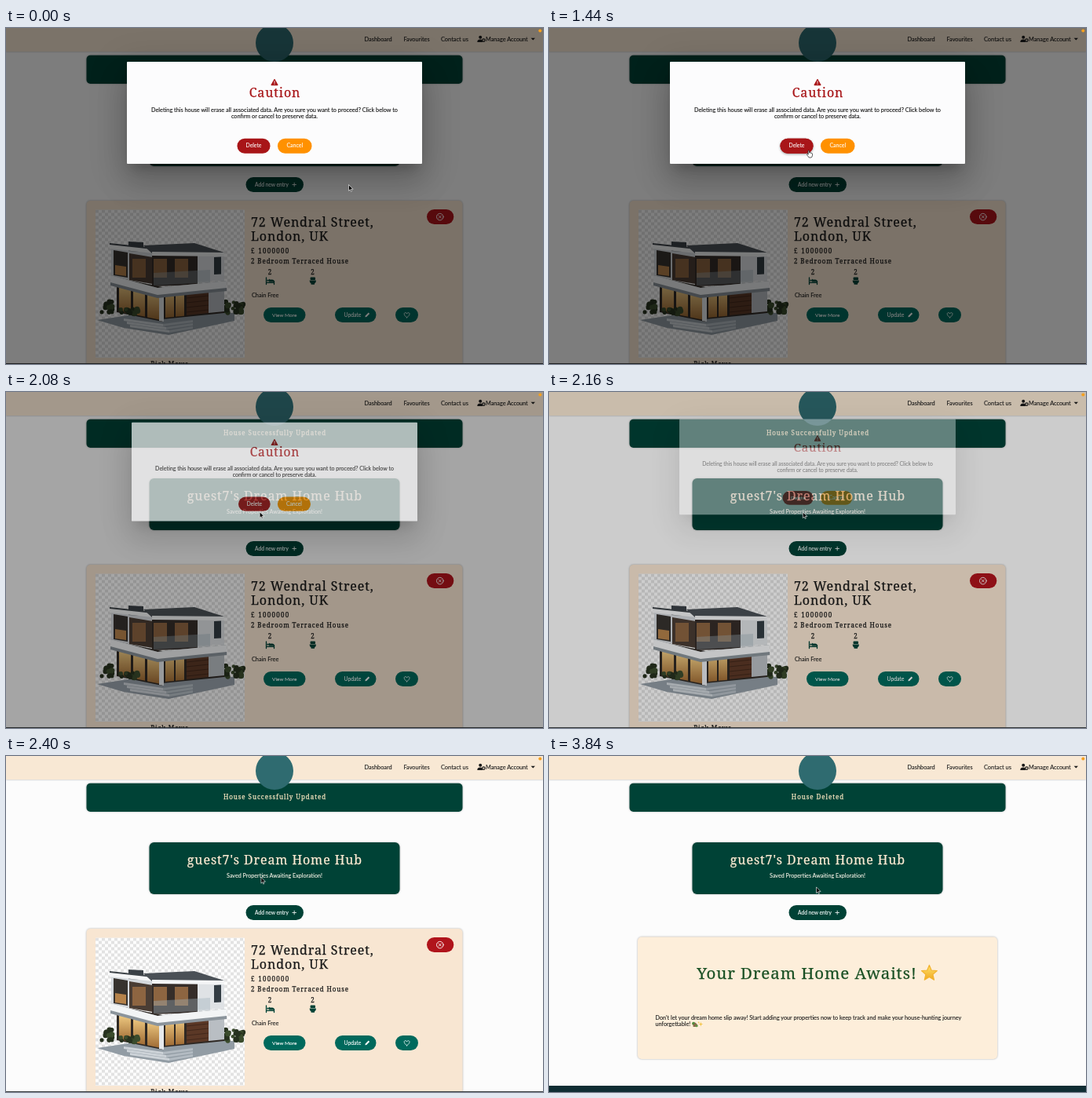
These frames come from a looping animation (684x428 px, 3.92 s). An HTML page:

```html
<!DOCTYPE html>
<html lang="en">
<head>
<meta charset="utf-8">
<title>Dream Home Hub</title>
<style>
html, body { margin: 0; width: 100%; height: 100%; overflow: hidden; background: #fcfcfc; }
svg { display: block; width: 100vw; height: 100vh; }
text { white-space: pre; }
.sans { font-family: Lato, "Open Sans", sans-serif; stroke-width: .1; }
.serif { font-family: "Noto Serif", serif; stroke-width: .25; }
.lift { filter: drop-shadow(0 .8px .8px rgba(0,0,0,.32)); }
</style>
</head>
<body>
<svg id="stage" viewBox="0 0 684 428" preserveAspectRatio="none"></svg>
<script>
const LOOP = 3920, STEP = 80, CLOSE = 2000, FADE = 260, SWAP = 2560;
const GREEN = '#004236', TEAL = '#00695c', SAND = '#f8e6d2', CREAM = '#fdeeda';
const RED = '#a81518', INK = '#1a1a1a', LIFT = 'class="lift"';

const text = (kind, x, y, s, size, fill, anchor, more = '') =>
  `<text class="${kind}" x="${x}" y="${y}" font-size="${size}" fill="${fill}" stroke="${fill}" text-anchor="${anchor}" ${more}>${s}</text>`;
const sans = (x, y, s, size = 7.3, fill = INK, anchor = 'start') => text('sans', x, y, s, size, fill, anchor);
// Centred text is nudged by half the trailing letter gap.
const serif = (x, y, s, size, fill = INK, anchor = 'start', gap = .9) =>
  text('serif', anchor === 'middle' ? x + gap / 2 : x, y, s, size, fill, anchor, `letter-spacing="${gap}"`);

const box = (x, y, w, h, fill, r = 0, more = '') =>
  `<rect x="${x}" y="${y}" width="${w}" height="${h}" rx="${r}" fill="${fill}" ${more}/>`;
const pill = (x, y, w, fill) => box(x, y, w, 19, fill, 9.5);
const path = (d, fill = 'none', more = '') => `<path d="${d}" fill="${fill}" ${more}/>`;
const disc = (x, y, r, fill, more = '') => `<circle cx="${x}" cy="${y}" r="${r}" fill="${fill}" ${more}/>`;
const line = (color, w) => `stroke="${color}" stroke-width="${w}" stroke-linecap="round" stroke-linejoin="round"`;
const group = (id, body) => `<g id="${id}">${body}</g>`;
const repeat = (n, f) => Array.from({ length: n }, (_, i) => f(i)).join('');
// A wall panel: upright sides, top and bottom sloping by `drop`.
const wall = (x, y, w, h, drop, fill, more) => path(`M${x} ${y}l${w} ${drop}v${h}l${-w} ${-drop}z`, fill, more);

const star = (cx, cy, R, r, n, fill, more = '') => path('M' + repeat(n * 2, i => {
  const a = i * Math.PI / n - Math.PI / 2, d = i % 2 ? r : R;
  return `${cx + d * Math.cos(a)} ${cy + d * Math.sin(a)} `;
}) + 'z', fill, more);

let seed = 7;
const random = () => (seed = seed * 16807 % 2147483647) / 2147483647;
const hedge = (x, y, w, h, n) => repeat(n, () =>
  disc(x + w * random(), y + h * random(), 2 + 2 * random(), random() < .6 ? '#27321f' : '#3b4c2d'));

const blur = (id, dev) => `<filter id="${id}" x="-50%" y="-100%" width="200%" height="300%"><feGaussianBlur stdDeviation="${dev}"/></filter>`;
const fade = (id, a, b) => `<linearGradient id="${id}" x2="0" y2="1"><stop stop-color="${a}"/><stop offset="1" stop-color="${b}"/></linearGradient>`;
const defs = `<defs>
  <pattern id="check" x="114" y="231.5" width="8" height="8" patternUnits="userSpaceOnUse">
    ${box(0, 0, 8, 8, '#fdfdfd')}${box(0, 0, 4, 4, '#e2e2e2')}${box(4, 4, 4, 4, '#e2e2e2')}
  </pattern>
  ${fade('gold', '#ffe36a', '#f0a822')}${fade('glow', '#f3cf86', '#a06c35')}
  ${blur('blur0', 19)}${blur('blur1', 23)}${blur('blur2', 7.5)}
</defs>`;

const header = box(0, 0, 684, 30, '#f8e8d4', 0, LIFT) + disc(342, 19, 24, '#2f6b70') +
  sans(456.5, 17.4, 'Dashboard', 7.4) + sans(506.5, 17.4, 'Favourites') +
  sans(554, 17.4, 'Contact us', 7.4) + sans(611, 17.4, 'Manage Account') +
  disc(604.2, 11.8, 2, INK) + path('M600.3 18c0-2.6 1.6-3.5 3.9-3.5l2 .4 1 3.1z', INK) +
  disc(608.4, 15.6, 1.7, 'none', line(INK, 1.2)) + path('M668.6 12.7h5.4l-2.7 2.7z', INK);

const hub = box(102.5, 34.7, 479, 36.3, GREEN, 5, LIFT) + box(182.5, 110, 319, 66, GREEN, 6, LIFT) +
  serif(342, 138, 'guest7\'s Dream Home Hub', 16, '#fdebd3', 'middle') +
  sans(342, 155.2, 'Saved Properties Awaiting Exploration!', 7.17, '#fdf6ea', 'middle') +
  pill(305.5, 190, 73.5, GREEN) + sans(317, 201.6, 'Add new entry', 6.65, '#fff') +
  path('M364.9 199.5h4.6m-2.3-2.3v4.6', 'none', line('#fff', .8));
const notice = s => serif(342, 55.3, s, 8, '#f3e2bd', 'middle', .95);

const house =
  path('M116 372l80-12 95 3v10l-84 18-57-9z', '#929ca4') +
  hedge(122, 348, 14, 15, 18) + hedge(278, 349, 24, 14, 26) +
  // ground floor
  wall(141, 318, 58, 44, 12, '#2f2924') + wall(199, 331, 79, 40, -8, '#2f2924') +
  repeat(3, i => wall(144 + i * 18, 328 + i * 3.7, 15, 33, 3, 'url(#glow)')) +
  repeat(2, i => wall(203 + i * 13, 335 - i * 1.3, 11, 34, -1, 'url(#glow)')) +
  wall(230, 330, 28, 36, -3, '#5b3826') +
  repeat(5, i => path(`M230 ${338 + i * 6}l28-3`, 'none', line('#3b2418', .8))) +
  wall(258, 327, 20, 36, -2, '#b9bec3') + wall(195, 332, 6, 41, 1, '#e6e9ec') +
  // upper floor and balcony
  wall(134, 277, 54, 40, 8, '#d5d9dd') + wall(137, 283, 18, 32, 3, '#37332f') +
  wall(139, 302, 14, 12, 2, '#b5824a') + wall(157, 287, 30, 34, 5, '#4a3d34') +
  wall(186, 289, 58, 40, -2, '#352d29') + repeat(3, i => wall(161 + i * 27, 294, 17, 24, 0, '#8d6541')) +
  wall(244, 287, 34, 36, -1, '#dfe2e5') + wall(265, 292, 9, 22, -.5, '#333c43') +
  wall(188, 312, 72, 16, -4, '#9db0ba', 'opacity=".4"') +
  // flat roofs, chimney and slab
  wall(156, 272, 19, 12, 1, '#3a4046') + wall(132, 275, 56, 6, 6, '#f4f5f6') + wall(132, 274, 56, 2, 6, '#3d4348') +
  path('M175 277l65-3 38 12-92 1z', '#4a5056') + wall(186, 285, 92, 5, 1, '#f4f5f6') +
  wall(133, 315, 60, 13, 16, '#8b949b') + wall(193, 331, 88, 13, -9, '#8b949b') +
  wall(133, 315, 60, 9, 16, '#f2f4f5') + wall(193, 331, 88, 9, -9, '#f2f4f5') +
  repeat(3, i => wall(150 + i * 4, 370 + i * 4, 50, 3, 7, '#cdd3d8') + wall(200 + i * 4, 377 + i * 4, 38 - i * 4, 3, -5, '#b3bbc2')) +
  hedge(142, 358, 26, 6, 20);

const listing = notice('House Successfully Updated') +
  box(102.5, 220, 479, 230, SAND, 5, LIFT) + box(114, 231.5, 190, 188.5, 'url(#check)') + house +
  serif(312, 252.8, '72 Wendral Street,', 16) + serif(312, 270.8, 'London, UK', 16) +
  serif(312, 286.6, '£ 1000000', 8, INK, 'start', 1.3) + serif(312, 300.2, '2 Bedroom Terraced House', 8) +
  serif(336, 314, '2', 8, INK, 'middle') + serif(390.5, 314, '2', 8, INK, 'middle') +
  path('M331.5 318v8.5m0-2.1h10m0 2.1v-4.2h-6v-1.8', 'none', line(GREEN, 1.3)) +
  path('M335 323.6v-3.2h4.4q2 0 2 2v1.2z', GREEN) + disc(333.6, 321.6, 1.2, GREEN) +
  box(387.6, 317.6, 6.4, 3.4, GREEN, .8) + path('M386.6 321.6h8.4q0 3-2 3.9v1.3h-4.4v-1.3q-2-.9-2-3.9z', GREEN) +
  sans(313, 343.4, 'Chain Free') +
  pill(328, 356, 53.5, TEAL) + sans(354.7, 367.8, 'View More', 6.5, '#fff', 'middle') +
  pill(419, 356, 52.5, TEAL) + sans(430.5, 367.8, 'Update', 6.8, '#fff') +
  path('M457.4 368.3l.4-1.8 3.9-3.9 1.4 1.4-3.9 3.9z', '#fff') + pill(496, 356, 29, TEAL) +
  path('M510.6 368.8c-5-3.6-3.5-6.2-1.9-6.2q1.3 0 1.9 1.3.6-1.3 1.9-1.3c1.6 0 3.1 2.6-1.9 6.2z', 'none', line('#fff', .8)) +
  pill(536, 231, 34.3, '#b0141b') + disc(552.8, 240.6, 4.3, 'none', line('#fff', .9)) +
  path('M551.1 238.9l3.4 3.4m0-3.4l-3.4 3.4', 'none', line('#fff', .9)) +
  serif(208, 431, 'Pick Mews', 8, INK, 'middle') + box(0, 427, 684, 1, '#3c4143');

const empty = notice('House Deleted') + box(113, 230.5, 458, 155.5, CREAM, 5, LIFT) +
  serif(328, 283.6, 'Your Dream Home Awaits!', 20.5, '#1a5024', 'middle') +
  star(484.4, 276.8, 10.4, 4.7, 5, 'url(#gold)', line('#f3b32f', 1.2)) +
  sans(135.5, 336, 'Don\'t let your dream home slip away! Start adding your properties now to keep track and make your house-hunting journey', 7.26) +
  sans(135.5, 344.4, 'unforgettable!', 7.26) +
  disc(184.2, 340.8, 2.1, '#4f8a3c') + path('M183.6 342.4l3-2.8 2.6 2.8v2.6h-5.6z', '#8b6a4c') + disc(188, 343.8, 1.5, '#5d9845') +
  star(193.4, 341.6, 3, .9, 4, '#f2c341') + star(190.8, 339.4, 1.4, .5, 4, '#f2c341') +
  box(0, 420, 684, 8, '#0f2d33');

const shadow = (i, dy, grow, alpha) =>
  box(154 - grow, 43 + dy - grow, 376 + 2 * grow, 130 + 2 * grow, '#000', 2, `opacity="${alpha}" filter="url(#blur${i})"`);
const modal = shadow(0, 24, 3, .14) + shadow(1, 9, 8, .12) + shadow(2, 11, -7, .2) +
  box(154, 43, 376, 130, '#fcfcfd', 1) +
  path('M342 65.6l3.9 7h-7.8z', RED, line(RED, 1.2)) + path('M342 67.8v2.3m0 1.5v.1', 'none', line('#fff', .9)) +
  serif(342, 87.5, 'Caution', 16, RED, 'middle') +
  sans(342, 106.6, 'Deleting this house will erase all associated data. Are you sure you want to proceed? Click below to', 7.28, '#111', 'middle') +
  sans(342, 114.8, 'confirm or cancel to preserve data.', 7.28, '#111', 'middle') +
  `<g id="hover" style="filter:drop-shadow(0 1.5px 1.5px rgba(0,0,0,.4))">${pill(294.5, 140.8, 42, RED)}</g>` +
  pill(294.5, 140.8, 42, RED) + sans(315.5, 152.4, 'Delete', 6.8, '#fff', 'middle') +
  pill(346, 140.8, 43.5, '#ff9100') + sans(367.8, 152.4, 'Cancel', 7, '#fff', 'middle');

const beam = 'M-1.7-4Q0-4 0-3 0-4 1.7-4M0-3V3M-1.7 4Q0 4 0 3 0 4 1.7 4M-.8.8H.8';
const pointers = {
  arrow: path('M0 0V7.4L1.7 5.8 2.8 8.3 4 7.8 2.9 5.3H5.2Z', '#000', line('#fff', .6)),
  hand: path('M-.7 4.6V.4Q0-.7.8.4V3q1-.5 1.4.2 1-.4 1.4.3 1-.2 1.1.7V6.2Q4.4 8.4 3.4 9H.4Q-.8 7.4-2.4 5.2-2.2 3.8-.7 4.6Z', '#fff', line('#000', .65)),
  beam: path(beam, 'none', line('#fff', 1.8)) + path(beam, 'none', line('#000', .9))
};

document.getElementById('stage').innerHTML = defs + box(0, 0, 684, 428, '#fcfcfc') + hub +
  group('listing', listing) + group('empty', empty) + header + box(0, 0, 684, 428, '#000', 0, 'id="shade"') +
  group('modal', modal) + Object.keys(pointers).map(id => group(id, pointers[id])).join('') +
  disc(680.3, 3.4, 2, '#f5a020');

const $ = id => document.getElementById(id);
const show = (id, on) => $(id).setAttribute('display', on ? 'inline' : 'none');
const clamp = p => Math.min(1, Math.max(0, p));
const ease = p => p * p * (3 - 2 * p);

// Pointer stops as [arrival time, x, y]; every hop takes HOP ms.
const HOP = 560;
const stops = [[0, 436.5, 200], [720, 328.5, 153.8], [1360, 335.7, 158], [1760, 323.2, 153], [2640, 326, 156], [3840, 340.5, 167.3]];
function pointerAt(t) {
  return stops.reduce(([x, y], [at, nx, ny]) => {
    const p = ease(clamp((t - at) / HOP + 1));
    return [x + (nx - x) * p, y + (ny - y) * p];
  }, stops[0].slice(1));
}

function draw(time) {
  const t = Math.floor((time % LOOP) / STEP) * STEP;
  const [x, y] = pointerAt(t);
  const gone = clamp((t - CLOSE) / FADE);
  const over = t <= CLOSE && Math.abs(x - 315.5) < 20 && y < 157;
  const onText = t > CLOSE + 2 * FADE - STEP && y < 158;

  show('listing', t < SWAP);
  show('empty', t >= SWAP);
  show('modal', gone < 1);
  show('hover', over);
  $('shade').setAttribute('opacity', .5 * (1 - gone));
  $('modal').setAttribute('opacity', 1 - gone);
  $('modal').setAttribute('transform',
    `translate(342 ${108 - 20.5 * gone}) scale(${1 - .104 * gone}) translate(-342 -108)`);

  const kind = over ? 'hand' : onText ? 'beam' : 'arrow';
  for (const id in pointers) show(id, id === kind);
  $(kind).setAttribute('transform', `translate(${x.toFixed(2)} ${y.toFixed(2)})`);
}

const start = performance.now();
function tick() {
  draw(performance.now() - start);
  requestAnimationFrame(tick);
}
tick();
</script>
</body>
</html>
```
